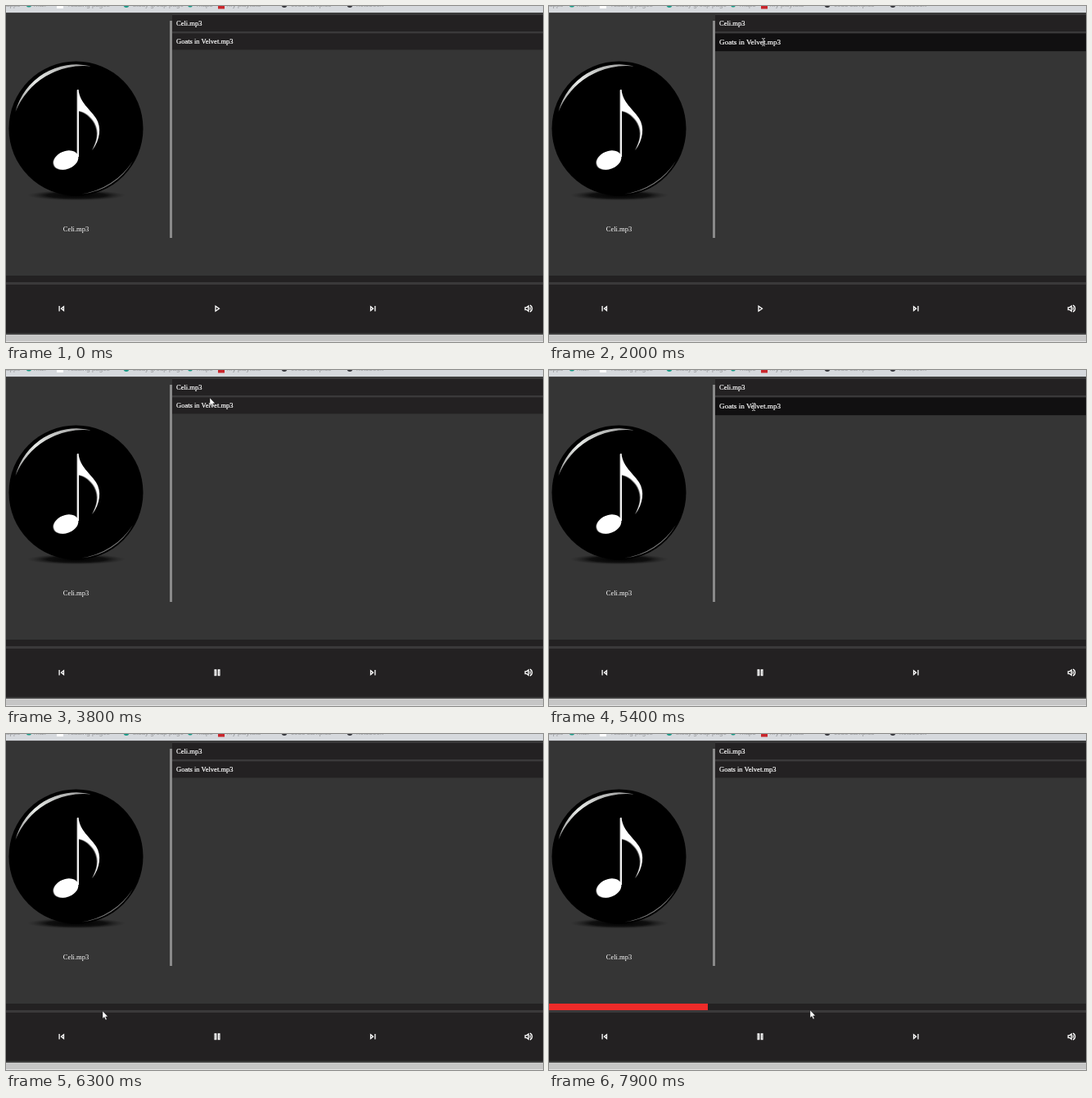
These frames come from a looping animation (656x410 px, 8000 ms). An HTML page:

```html
<!DOCTYPE html>
<html lang="en">
<head>
<meta charset="utf-8">
<title>Music player</title>
<style>
  html, body { margin: 0; width: 100%; height: 100%; overflow: hidden; background: #353535; }
  svg { display: block; width: 656px; height: 410px; }
  text { font-family: "Liberation Serif", "Times New Roman", serif; fill: #fff; }
  .tabs text { font: 8px "Liberation Sans", Arial, sans-serif; fill: #444; opacity: .45; }

  /* every part shares one 8 s clock; steps(n) holds each pose for 100 ms */
  .move, .arrow, .beam, .row, .push, .play, .pause, .bar {
    animation: 8s step-end -10ms infinite;
  }

  .row { fill: #232122; font-size: 8.5px; }
  .row rect { height: 2.36em; }
  .row text { transform: translateY(1.47em); stroke: #fff; stroke-width: .2px; }
  .first { animation-name: first; }
  .second { animation-name: second; }
  .push { animation-name: push; }
  @keyframes first {
    26.25% { fill: #111011; font-size: 9.2px; }
    47.5% { fill: #232122; font-size: 8.5px; }
  }
  @keyframes second {
    25% { fill: #111011; font-size: 9.2px; }
    26.25% { fill: #232122; font-size: 8.5px; }
    48.75% { fill: #111011; font-size: 9.2px; }
    68.75% { fill: #232122; font-size: 8.5px; }
  }
  @keyframes push {
    26.25% { transform: translateY(1px); }
    47.5% { transform: none; }
  }

  .play { animation-name: play; }
  .pause { opacity: 0; animation-name: pause; }
  @keyframes play { 36.25%, 100% { opacity: 0; } }
  @keyframes pause { 36.25%, 100% { opacity: 1; } }

  .bar { width: 0; animation-name: seek; }
  @keyframes seek {
    0% { width: 0; }
    86.25% { width: 188px; animation-timing-function: steps(10); }
    98.75%, 100% { width: 194px; }
  }

  .arrow { opacity: 0; animation-name: arrow; }
  .beam { opacity: 0; animation-name: beam; }
  @keyframes arrow {
    13.75% { opacity: 1; }
    25% { opacity: 0; }
    26.25% { opacity: 1; }
    48.75% { opacity: 0; }
    68.75%, 100% { opacity: 1; }
  }
  @keyframes beam {
    25% { opacity: 1; }
    26.25% { opacity: 0; }
    48.75% { opacity: 1; }
    68.75% { opacity: 0; }
  }

  .move { animation-name: move; }
  @keyframes move {
    0% { transform: translate(234px, 271px); }
    13.75% { transform: translate(234px, 271px); animation-timing-function: steps(8); }
    23.75% { transform: translate(259px, 74px); }
    25% { transform: translate(262px, 44px); }
    26.25% { transform: translate(254px, 20px); }
    27.5% { transform: translate(250px, 13px); }
    30% { transform: translate(250px, 15px); }
    31.25% { transform: translate(250px, 18px); }
    46.25% { transform: translate(250px, 19px); }
    47.5% { transform: translate(249px, 34px); }
    48.75% { transform: translate(250px, 42px); animation-timing-function: steps(3); }
    52.5% { transform: translate(250px, 45px); }
    68.75% { transform: translate(247px, 66px); animation-timing-function: steps(4); }
    73.75% { transform: translate(178px, 278px); animation-timing-function: steps(3); }
    77.5% { transform: translate(1px, 387px); }
    78.75% { transform: translate(118px, 338px); animation-timing-function: steps(2); }
    81.25% { transform: translate(157px, 336px); }
    85% { transform: translate(178px, 336px); }
    86.25% { transform: translate(188px, 336px); animation-timing-function: steps(7); }
    95% { transform: translate(290px, 336px); animation-timing-function: steps(2); }
    97.5%, 100% { transform: translate(319px, 337px); }
  }
</style>
</head>
<body>
<svg viewBox="0 0 656 410">
  <defs>
    <radialGradient id="shade">
      <stop offset="0" stop-color="#000"/>
      <stop offset=".6" stop-color="#0b0b0b" stop-opacity=".9"/>
      <stop offset="1" stop-color="#222" stop-opacity="0"/>
    </radialGradient>
    <linearGradient id="gloss" x1="0" y1="1" x2="1" y2="0">
      <stop offset="0" stop-color="#888"/>
      <stop offset=".45" stop-color="#e8ebe8"/>
      <stop offset="1" stop-color="#999"/>
    </linearGradient>
    <g id="note">
      <ellipse cx="73.3" cy="188" rx="15.7" ry="10.8" transform="rotate(-22 73.3 188)"/>
      <path d="M87.2 102H88.6C90 118 103 126 110 137C117 148 115 163 105.5 176C112 164 114 154 108.5 143C104 135 97 129.5 89 128V184H87.2Z"/>
    </g>
    <path id="skip" d="M-2.9 -3.3V3.3M2.5 -2.4L-.5 0L2.5 2.4Z"/>
  </defs>

  <rect width="656" height="410" fill="#353535"/>

  <!-- browser strip -->
  <rect width="656" height="8" fill="#d6d9dd"/>
  <rect y="8" width="656" height="1" fill="#484849"/>
  <g class="tabs">
    <g fill="#159a86">
      <circle cx="28" cy="-2" r="3.5"/><circle cx="147" cy="-1.5" r="3.5"/><circle cx="225" cy="-1.5" r="3"/>
    </g>
    <rect x="62" y="-4" width="8" height="7" fill="#fff"/>
    <rect x="259" y="-5" width="8" height="8.5" fill="#c9252b"/>
    <g fill="#33343a"><circle cx="340" cy="-1.5" r="3.5"/><circle cx="420" cy="-1.5" r="3.5"/></g>
    <text x="0" y="1">apps</text>
    <text x="34" y="1">mail</text>
    <text x="76" y="1">reading pages</text>
    <text x="155" y="1">study group page</text>
    <text x="233" y="1">maps</text>
    <text x="270" y="1">my playlists</text>
    <text x="348" y="1">code samples</text>
    <text x="428" y="1">notebook</text>
  </g>

  <!-- cover -->
  <ellipse cx="86" cy="231" rx="60" ry="6.5" fill="url(#shade)"/>
  <circle cx="85.5" cy="149.5" r="82" fill="#000"/>
  <path d="M11.5 129A77 77 0 0 1 104 73.5A90 90 0 0 0 11.5 129Z" fill="url(#gloss)"/>
  <path d="M155 189A80 80 0 0 1 92 229.5A90 90 0 0 0 155 189Z" fill="#777"/>
  <use href="#note" x="-.9" y=".4" fill="#777"/>
  <use href="#note" fill="#fff"/>
  <text x="85.5" y="274.7" text-anchor="middle" style="font-size:8.5px">Celi.mp3</text>
  <rect x="200" y="18" width="3" height="265" fill="#8a8a8a"/>

  <!-- track list -->
  <rect x="203" y="10" width="453" height="43.5" fill="#3b3a3b"/>
  <g class="push">
    <g class="row second">
      <rect x="203" y="33.4" width="453"/>
      <text x="208" y="33.8">Goats in Velvet.mp3</text>
    </g>
  </g>
  <g class="row first">
    <rect x="203" y="11" width="453"/>
    <text x="208" y="11.1">Celi.mp3</text>
  </g>

  <!-- player -->
  <rect y="329" width="656" height="8" fill="#232122"/>
  <rect class="bar" y="329" height="8" fill="#ee2b29"/>
  <rect y="337" width="656" height="3" fill="#3a393a"/>
  <rect y="340" width="656" height="59" fill="#232122"/>
  <rect y="399" width="656" height="2" fill="#3d3d3d"/>
  <rect y="401" width="656" height="9" fill="#c6c6c6"/>
  <rect y="409" width="656" height="1" fill="#e4e4e4"/>
  <g fill="none" stroke="#fff" stroke-width="1.3">
    <use href="#skip" x="68" y="369.2"/>
    <use href="#skip" transform="translate(448 369.2) scale(-1 1)"/>
    <path class="play" d="M256 366.2V372.2L260.4 369.2Z"/>
    <path class="pause" d="M255.1 366V372.6H256.7V366ZM259.3 366V372.6H260.9V366Z"/>
    <path d="M634.2 367.8H635.9L638.2 366V372.4L635.9 370.6H634.2ZM639.9 367.5Q641.1 369.2 639.9 370.9M640 365.2Q642.6 366.3 642.6 369.2T640 373.2"/>
  </g>

  <!-- pointer -->
  <g class="move">
    <path class="arrow" d="M0 0V9.2L2.1 7.4L3.7 11L5.2 10.3L3.7 6.9L6.4 6.7Z" fill="#fff" stroke="#111" stroke-width=".4"/>
    <path class="beam" d="M-2 -4.5Q0 -4.5 0 -3.5Q0 -4.5 2 -4.5M0 -3.5V3.5M-2 4.5Q0 4.5 0 3.5Q0 4.5 2 4.5" fill="none" stroke="#ccc" stroke-width=".9"/>
  </g>
</svg>
</body>
</html>
```
